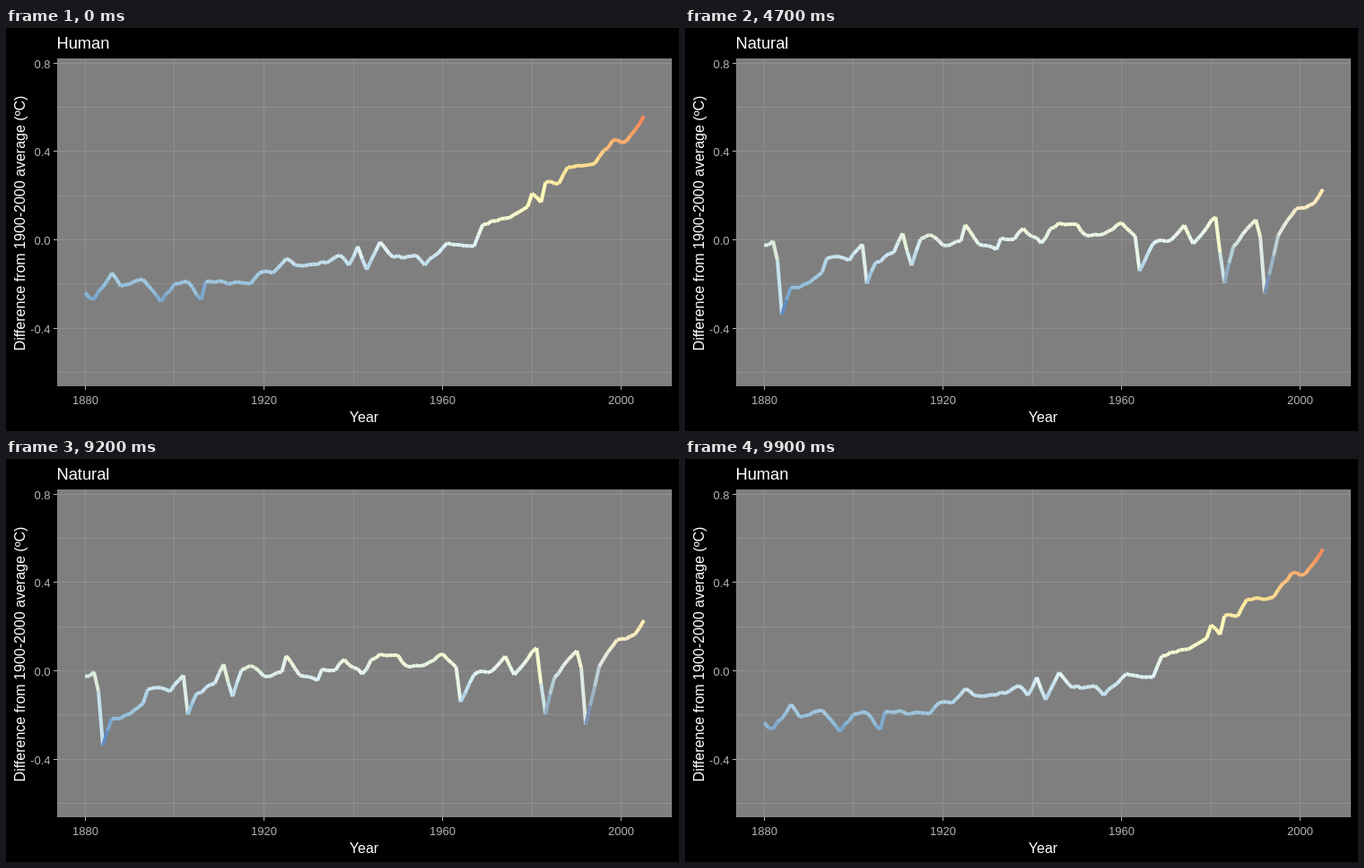
These frames come from a looping animation (750 by 450 pixels, 10 s). An HTML page:

```html
<!DOCTYPE html>
<html lang="en">
<head>
<meta charset="utf-8">
<title>Temperature difference</title>
<style>
  html, body { margin: 0; width: 100%; height: 100%; overflow: hidden; background: #000; }
  svg { display: block; width: 750px; height: 450px; }
  text { font-family: "Liberation Sans", Arial, sans-serif; font-size: 16px; fill: #fff; }
  #title { font-size: 18.3px; }
  .tick text { font-size: 13px; fill: #b3b3b3; }
  .tick line { stroke: #b3b3b3; }
  .grid line { stroke: #8f8f8f; }
  .grid, .tick { shape-rendering: crispEdges; }
  #curve { stroke-width: 4; }
</style>
</head>
<body>
<svg viewBox="0 0 750 450">
  <rect width="750" height="450"/>
  <rect x="57" y="34" width="685" height="366" fill="#7f7f7f"/>
  <g class="grid" id="grid"></g>
  <g class="tick" id="ticks"></g>
  <g id="curve"></g>
  <text id="title" x="56.5" y="23">Human</text>
  <text x="399" y="440" text-anchor="middle">Year</text>
  <text transform="translate(21 218) rotate(-90)" text-anchor="middle">Difference from 1900-2000 average (ºC)</text>
</svg>
<script>
  const firstYear = 1880, lastYear = 2005;

  // Main turning points: year, degrees
  const humanTurns = [
    [1880, -.24], [1882, -.27], [1886, -.15], [1888, -.21], [1893, -.18], [1897, -.28], [1900, -.2],
    [1903, -.19], [1906, -.27], [1907, -.19], [1917, -.2], [1919, -.15], [1922, -.15], [1925, -.085],
    [1927, -.115], [1934, -.105], [1937, -.07], [1939, -.115], [1941, -.03], [1943, -.135], [1946, -.01],
    [1949, -.08], [1954, -.07], [1956, -.115], [1961, -.015], [1967, -.03], [1969, .07], [1975, .1],
    [1979, .15], [1980, .21], [1982, .17], [1983, .26], [1986, .255], [1988, .33], [1994, .345],
    [1998, .45], [2001, .445], [2005, .56]];
  const naturalTurns = [
    [1880, .02], [1882, .05], [1883, -.065], [1884, -.365], [1886, -.23], [1890, -.195], [1893, -.14],
    [1894, -.06], [1897, -.035], [1899, -.065], [1902, .015], [1903, -.2], [1905, -.07], [1909, -.03],
    [1911, .075], [1913, -.1], [1915, .045], [1917, .07], [1920, 0], [1924, .015], [1925, .1],
    [1928, 0], [1932, -.03], [1933, .03], [1936, .02], [1938, .08], [1942, 0], [1944, .08],
    [1950, .1], [1952, .04], [1955, .045], [1960, .1], [1963, .025], [1964, -.165], [1967, -.015],
    [1971, -.02], [1974, .06], [1976, -.045], [1981, .085], [1983, -.29], [1985, -.09], [1990, .04],
    [1991, -.055], [1992, -.365], [1995, -.055], [1999, .075], [2003, .095], [2005, .16]];

  const palette = ['#4575b4', '#91bfdb', '#e0f3f8', '#ffffbf', '#fee090', '#fc8d59', '#d73027'];
  const coldest = -0.4, warmest = 0.7;
  const xOf = year => 88.1 + (year - firstYear) * 4.982;
  const yOf = degrees => 236.5 - degrees * 246.5;
  const crisp = v => Math.floor(v) + 0.5;
  const lerp = (a, b, share) => a + (b - a) * share;
  const byId = id => document.getElementById(id);

  function add(parent, name, attrs, text = '') {
    const el = document.createElementNS('http://www.w3.org/2000/svg', name);
    for (const key in attrs) el.setAttribute(key, attrs[key]);
    el.textContent = text;
    parent.append(el);
    return el;
  }

  const line = (parent, x1, y1, x2, y2) => add(parent, 'line', { x1, y1, x2, y2 });

  const mix = (a, b, share) => `color-mix(in lab, ${a}, ${b} ${(share * 100).toFixed(2)}%)`;

  function colourAt(degrees) {
    const last = palette.length - 1;
    const pos = Math.min(last, Math.max(0, (degrees - coldest) / (warmest - coldest) * last));
    const i = Math.min(last - 1, Math.floor(pos));
    return mix(palette[i], palette[i + 1], pos - i);
  }

  // Yearly values between the turning points, with a slight seeded roughness
  function yearly(turns) {
    let seed = 7;
    const noise = () => (seed = seed * 16807 % 2147483647) / 2147483647 - 0.5;
    const values = [turns[0][1]];
    for (let k = 1; k < turns.length; k++) {
      const [from, a] = turns[k - 1], [to, b] = turns[k];
      for (let year = from + 1; year < to; year++) {
        values.push(lerp(a, b, (year - from) / (to - from)) + noise() * 0.016);
      }
      values.push(b);
    }
    return values;
  }

  for (let year = 1880; year <= 2000; year += 20) {
    const x = crisp(xOf(year));
    line(byId('grid'), x, 34, x, 400);
    if (year % 40) continue;
    line(byId('ticks'), x, 400, x, 404);
    add(byId('ticks'), 'text', { x, y: 420, 'text-anchor': 'middle' }, year);
  }
  for (let tenths = -6; tenths <= 8; tenths += 2) {
    const y = crisp(yOf(tenths / 10));
    line(byId('grid'), 57, y, 742, y);
    if (tenths % 4) continue;
    line(byId('ticks'), 53, y, 57, y);
    add(byId('ticks'), 'text', { x: 49.5, y: y + 5, 'text-anchor': 'end' }, (tenths / 10).toFixed(1));
  }

  const human = yearly(humanTurns), natural = yearly(naturalTurns);
  const humanColours = human.map(colourAt), naturalColours = natural.map(colourAt);
  const segments = [];
  for (let year = firstYear; year < lastYear; year++) {
    segments.push(line(byId('curve'), xOf(year), 0, xOf(year + 1), 0));
  }

  // Share of the natural series: hold, eased change, hold, eased change back
  function shareAt(step) {
    const ease = k => (1 - Math.cos(Math.PI * k / 11)) / 2;
    if (step < 40) return 0;
    if (step < 50) return ease(step - 39);
    if (step < 90) return 1;
    return 1 - ease(step - 89);
  }

  function draw(step) {
    const share = shareAt(step);
    const ys = human.map((degrees, i) => yOf(lerp(degrees, natural[i], share)));
    segments.forEach((segment, i) => {
      segment.setAttribute('y1', ys[i]);
      segment.setAttribute('y2', ys[i + 1]);
      segment.style.stroke = mix(humanColours[i], naturalColours[i], share);
    });
    byId('title').textContent = share > 0.5 ? 'Natural' : 'Human';
  }

  const start = performance.now();
  let shown = -1;
  function tick() {
    const step = Math.floor((performance.now() - start) % 10000 / 100);
    if (step !== shown) draw(shown = step);
    requestAnimationFrame(tick);
  }
  tick();
</script>
</body>
</html>
```
